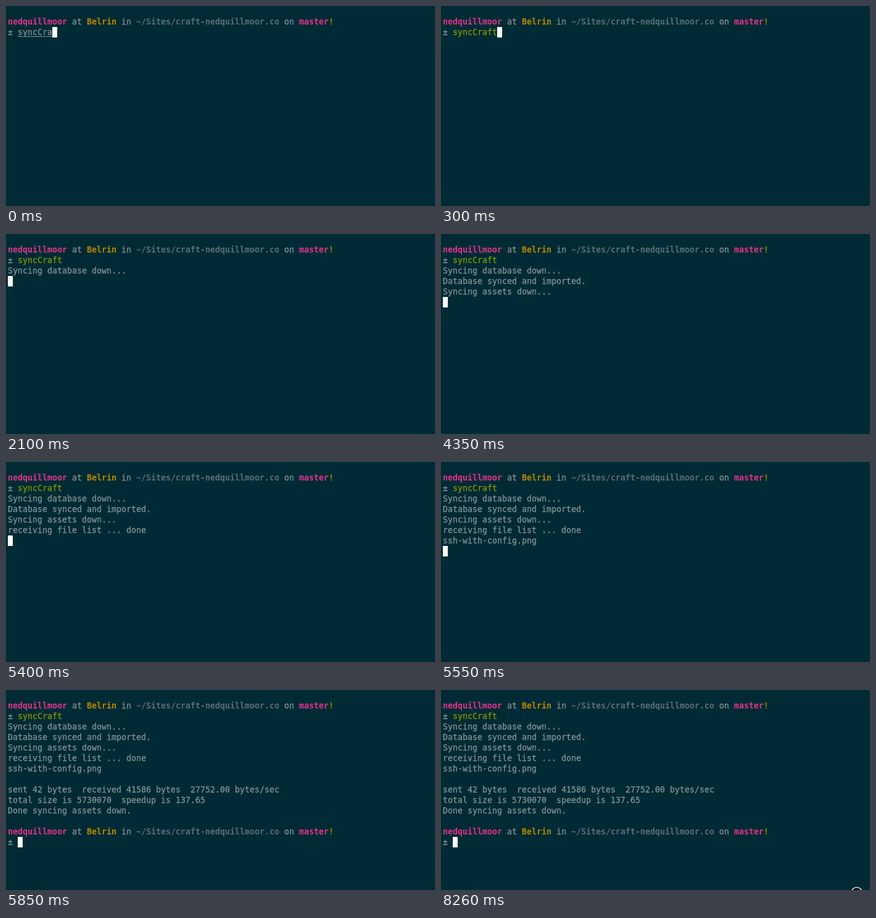
An HTML page for the animation above (8.34 s loop, 695x324 px).

```html
<!DOCTYPE html>
<html lang="en">
<head>
<meta charset="utf-8">
<style>
  html, body { margin: 0; width: 100%; height: 100%; overflow: hidden; background: #002b35; }
  #terminal {
    position: absolute; left: 3px; top: 17px; margin: 0;
    font: 13.29px/17px "DejaVu Sans Mono", Menlo, monospace;
    font-variant-ligatures: none;
    -webkit-text-stroke: 0.25px;
    color: #839496; white-space: pre;
  }
  .row { height: 17px; }
  .user, .host, .path, .dirty { font-weight: bold; -webkit-text-stroke: 0; }
  .user { color: #e0338a; }
  .host { color: #b58900; }
  .path { color: #586e75; }
  .good, .dirty { color: #859900; }
  .typing { text-decoration: underline 1px; text-underline-offset: 2px; }
  #cursor { position: absolute; width: 8px; height: 17px; background: #fff; }
  #badge { position: absolute; left: 664px; bottom: 0; overflow: hidden; }
</style>
</head>
<body>
<div id="terminal"></div>
<div id="cursor"></div>
<svg id="badge" width="19" height="5"><circle cx="9.5" cy="9.5" r="8.8" fill="#10191c" stroke="#fff" stroke-width="1.2"/></svg>
<script>
const LOOP = 8340, BADGE_AT = 8260;
const CELL = { width: 8, height: 17, left: 3, top: 17 };
const terminal = document.getElementById("terminal");
const cursor = document.getElementById("cursor");
const badge = document.getElementById("badge");

const span = (style, text) => `<span class="${style}">${text}</span>`;
const prompt = [
  span("user", "nedquillmoor"), " at ", span("host", "Belrin"), " in ",
  span("path", "~/Sites/craft-nedquillmoor.co"), " on ",
  span("user", "master"), span("dirty", "!")
].join("");

const output = [
  [2100, "Syncing database down..."],
  [4350, "Database synced and imported."],
  [4350, "Syncing assets down..."],
  [5400, "receiving file list ... done"],
  [5550, "ssh-with-config.png"],
  [5700, ""],
  [5700, "sent 42 bytes  received 41586 bytes  27752.00 bytes/sec"],
  [5700, "total size is 5730070  speedup is 137.65"],
  [5700, "Done syncing assets down."],
  [5850, ""],
  [5850, prompt],
  [5850, "± "]
];

function screenAt(time) {
  const typed = "syncCraft".slice(0, 7 + Math.min(2, Math.floor(time / 150)));
  const command = "± " + span(time < 300 ? "typing" : "good", typed);
  const rows = [prompt, command];
  for (const [start, line] of output) if (time >= start) rows.push(line);

  if (time < 600) return { rows, column: 2 + typed.length, row: 1 };
  if (time < 5850) return { rows, column: 0, row: rows.length };
  return { rows, column: 2, row: rows.length - 1 };
}

let shown = "";
function draw() {
  const time = performance.now() % LOOP;
  const { rows, column, row } = screenAt(time);
  const html = rows.map(line => `<div class="row">${line}</div>`).join("");
  if (html !== shown) terminal.innerHTML = shown = html;
  cursor.style.left = CELL.left + column * CELL.width + "px";
  cursor.style.top = CELL.top + row * CELL.height + "px";
  badge.style.visibility = time >= BADGE_AT ? "visible" : "hidden";
  requestAnimationFrame(draw);
}
draw();
</script>
</body>
</html>
```
